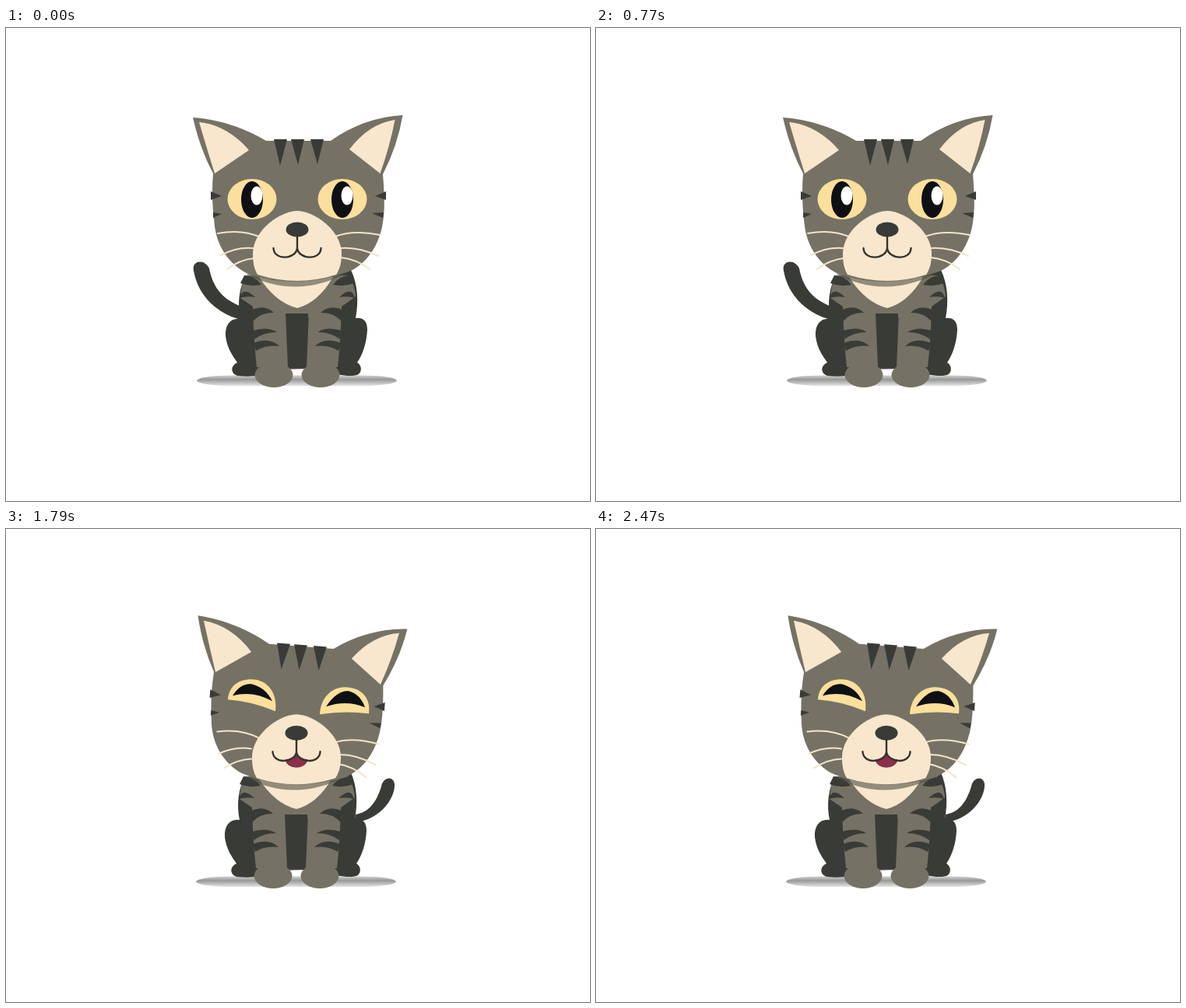
These frames come from a looping animation (750x608 px, 2940 ms). An HTML page:

```html
<!DOCTYPE html>
<html lang="en">
<head>
<meta charset="utf-8">
<title>Cat</title>
<style>
  html, body { margin: 0; width: 100%; height: 100%; overflow: hidden; background: #fff; }
  svg { display: block; width: 100vw; height: 100vh; }
  .dark { fill: #393b36; }
  .fur { fill: #757265; }
  .cream { fill: #f8e7cc; }
  .iris { fill: #fbdf9c; }
  .pupil { fill: #0e1013; }
  .whiskers { fill: none; stroke: #f6e4c8; stroke-width: 2; stroke-linecap: round; }
  .mouth { fill: none; stroke: #34342f; stroke-width: 2.4; stroke-linecap: round; }
</style>
</head>
<body>
<svg viewBox="0 0 750 608">
  <defs>
    <linearGradient id="shade" x2="0" y2="1">
      <stop offset="0" stop-color="#d2d2d2"/>
      <stop offset=".4" stop-color="#999"/>
      <stop offset="1" stop-color="#e4e4e4"/>
    </linearGradient>
    <g id="leg">
      <path class="fur" d="M317 358L359 366 362 436H322Q318 400 317 358Z"/>
      <ellipse class="fur" cx="344" cy="446" rx="24.5" ry="16"/>
      <path class="dark" d="M316 362Q333 355 344 366Q328 365 317 377ZM317 389Q336 383 348 391Q331 391 319 400ZM318 405Q339 397 351 409Q334 407 321 415Z"/>
    </g>
    <path id="shoulder" class="dark" d="M306 318Q319 318 328 330Q313 333 301 328ZM300 347Q304 331 320 346Q309 344 300 347Z"/>
    <g id="openEye">
      <ellipse class="iris" cx="316" cy="220" rx="31.500" ry="26"/>
      <ellipse class="pupil" cx="316" cy="220.500" rx="14" ry="23.500"/>
      <ellipse cx="322" cy="215.500" rx="7.500" ry="12" fill="#fff"/>
    </g>
  </defs>

  <g id="body">
    <rect x="245" y="446.500" width="257" height="13.500" rx="45" ry="6.750" fill="url(#shade)"/>
    <path id="tailLeft" class="dark" d="M241 312C238 299 255 296 261 309C265 330 276 350 306 359V376C268 368 246 341 241 312Z"/>
    <path id="tailRight" class="dark" d="M483 331C485 318 499 317 500 328C501 346 481 375 448 377L450 367C468 364 477 350 483 331Z"/>
    <path class="dark" d="M309 318C299 332 297 355 301 374C289 372 281 381 282 396C284 412 291 421 297 430C288 434 288 444 297 447Q315 449 326 446Q350 437 386 438H410L425 445Q445 449 453 445C458 440 456 433 451 430C459 418 463 404 464 388C464 376 458 372 449 373C453 352 452 330 443 311Z"/>
    <path d="M366 437.500H382" stroke="#5b3a4d" stroke-width="1.500"/>
    <path class="fur" d="M308 318H440Q448 330 449 345Q440 352 431 358V372H388V367H359V372H317V358Q308 352 301 347Q302 330 308 318Z"/>
    <use id="legLeft" href="#leg"/>
    <g id="legRight"><use href="#leg" transform="translate(748)scale(-1 1)"/></g>
    <g id="arm">
      <path class="fur" d="M239 332C239 316 262 308 282 315C290 318 293 325 296 331L306 318H388V373L354 371C345 388 332 399 318 400C301 402 288 392 281 377C276 366 273 353 266 350.500C250 352 239 346 239 332Z"/>
      <path class="dark" d="M295 334Q297 345 307 352L320 358Q316 362 319 377Q313 370 311 363Q302 358 292 363Q299 354 299 350Q293 344 295 334Z"/>
    </g>
    <use href="#shoulder"/>
    <use href="#shoulder" transform="translate(748)scale(-1 1)"/>
    <path class="cream" d="M325 320Q346 353 374 360Q401 353 420 320Z"/>
    <path id="chinShade" d="M308 316Q374 351 443 312Z" fill="#4a4a40" fill-opacity=".58"/>
  </g>

  <g id="head">
    <path class="fur" d="M240 115Q290 119 334 145H417Q459 115 509.500 112Q503 151 484 188C487 225 487 250 478 272C470 293 455 306 443 312Q374 338 311 316C290 306 272 285 268 255C265 230 264 210 266 187Q249 155 240 115Z"/>
    <path class="cream" d="M248 121Q284 125 312 157L268 187Q258 155 248 121ZM499.500 118Q466 123 441 156L480.500 187Q493 152 499.500 118Z"/>
    <path class="dark" d="M344 143H361L352 177ZM366 143H383L375 176ZM391 143H408L400 175ZM263 210L277 216 263 221ZM266 237L277 239 266 244ZM488 210L474 216 488 221ZM485 237L470 238 484 244Z"/>
    <g id="open">
      <use href="#openEye"/>
      <use href="#openEye" x="116"/>
    </g>
  </g>

  <path id="whiskers" class="whiskers" d="M272 264Q303 258 327 269M276 292Q297 281 317 283M284 310Q300 298 318 296M423 268Q445 259 480 266M430 283Q452 281 478 293M430 295Q450 297 467 310"/>

  <g id="face">
    <path class="cream" d="M374 235C399 236 431 262 431 290C431 303 428 311 424 317Q374 333 323 317C319 310 317 303 317 290C317 262 349 236 374 235Z"/>
    <path id="tongue" d="M359 293Q369 292 374 285Q379 292 389 293Q386 303 374 303.500Q362 303 359 293Z" fill="#8b3049"/>
    <ellipse class="dark" cx="374" cy="259" rx="14.500" ry="9.500"/>
    <path class="mouth" d="M374 267V283C372 298 344 299 343.500 283M374 283C376 298 404 299 404.500 283"/>
    <g id="closed">
      <path class="iris" d="M286 216C287 200 298 190 316 190C338 190 350 209 347 231Q316 218 286 216ZM404 235C405 214 419 200 436 200C457 200 470 214 467 234Q435 230 404 235Z"/>
      <path class="pupil" d="M292 211Q302 195 316 196Q334 200 343 218Q318 204 292 211ZM412 225Q426 204 441 205Q456 209 462 226Q438 216 412 225Z"/>
    </g>
  </g>
</svg>
<script>
const part = id => document.getElementById(id);
const LOOP = 2940;

// tilt in degrees; x/y place the face, dx/dy the body
const front = { tilt: 0, x: 0, y: 0, dx: 0, dy: 0, tail: 'left', move: '' };
const leanLeft = { ...front, tilt: -5, x: -.5, y: 3, dx: -.7, dy: -.5, move: 'rotate(-3.5 300 368)' };
const leanRight = { ...front, tilt: 4.3, x: .7, y: 3.3, dx: 1, move: 'translate(-3 -2)' };
const curious = { ...leanRight, x: -.7, dx: -.5, tail: 'right', move: '' };
const happy = { ...curious, x: -1, dx: -1, smile: 1 };
const wave = { ...happy, y: 5, dx: 0, smile: 1.2, paw: true, move: 'translate(450 372)scale(1.1)translate(-450 -372)' };

const steps = [
  [0, front], [430, leanLeft], [770, front], [1110, leanRight],
  [1450, curious], [1790, happy], [2130, wave], [2470, happy]
];

const place = (id, transform) => part(id).setAttribute('transform', transform);
const show = (id, on) => part(id).setAttribute('display', on ? 'inline' : 'none');

function draw(p) {
  const squash = p.tilt ? .984 : 1;
  const smile = p.smile || 1;
  place('body', `translate(${p.dx} ${p.dy})`);
  place('head', `translate(${374 + p.x - p.tilt * .25} ${225 + p.y * 1.3})rotate(${p.tilt})scale(1 ${squash})translate(-374 -225)`);
  place('whiskers', `translate(${p.x} ${p.y})rotate(${p.tilt * .9} 374 265)`);
  place('face', `translate(${p.x} ${p.y})`);
  place('chinShade', `translate(0 ${p.y * .9})`);
  place('tailLeft', p.move);
  place('tailRight', p.move);
  place('legRight', p.paw ? 'translate(389.500 358)scale(1.06)translate(-388 -358)' : '');
  place('tongue', `translate(0 ${288 * (1 - smile)})scale(1 ${smile})`);
  show('tailLeft', p.tail === 'left');
  show('tailRight', p.tail === 'right');
  show('legLeft', !p.paw);
  show('arm', p.paw);
  show('open', !p.smile);
  show('closed', p.smile);
  show('tongue', p.smile);
}

const start = performance.now();
let current;
function tick() {
  const time = (performance.now() - start) % LOOP;
  const pose = steps.findLast(([at]) => at <= time)[1];
  if (pose !== current) draw(current = pose);
  requestAnimationFrame(tick);
}
tick();
</script>
</body>
</html>
```
